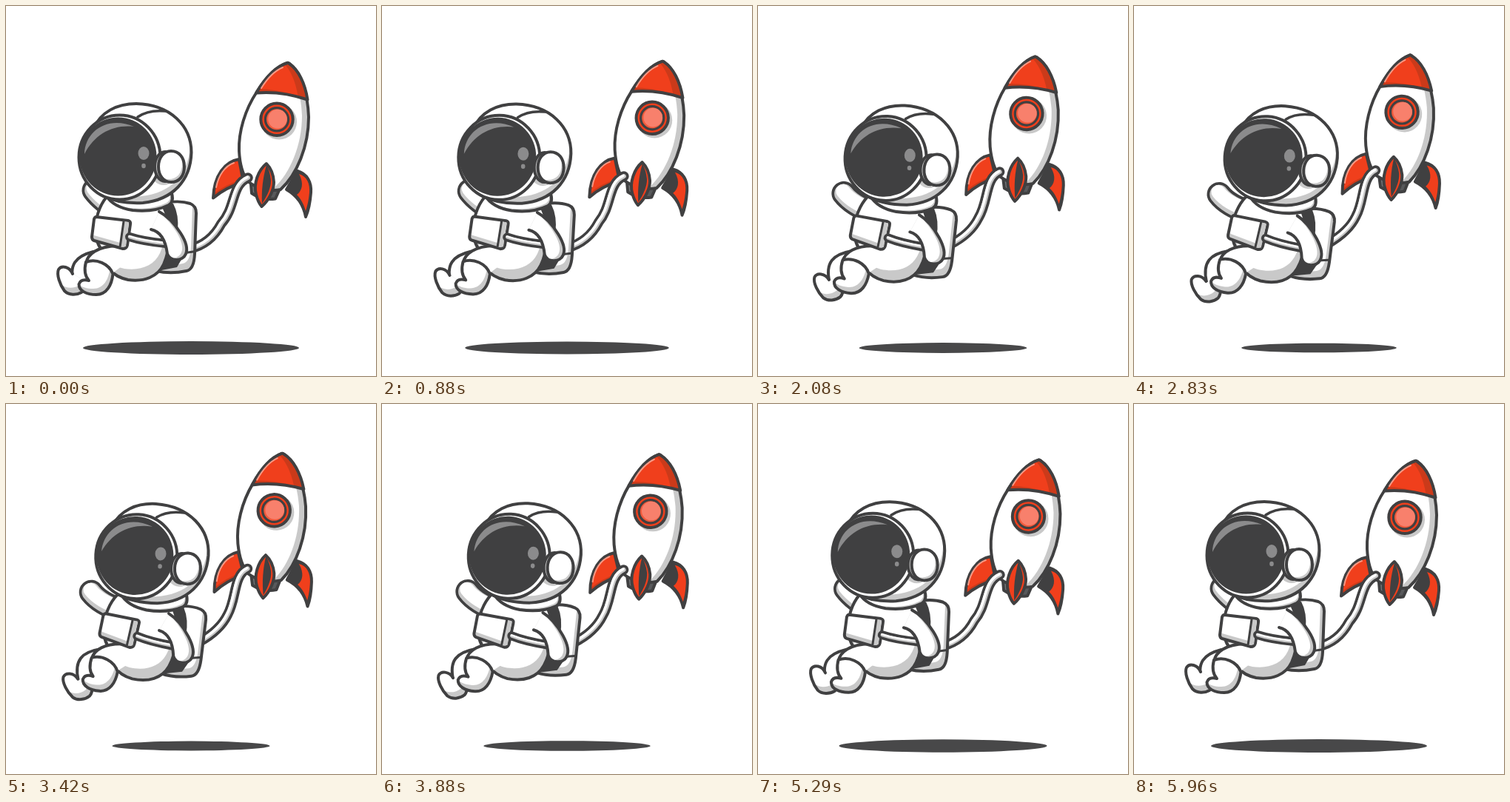
An HTML page that plays this animation: 500x500 px, repeating every 6 s.

```html
<!DOCTYPE html>
<html lang="en">
<head>
<meta charset="utf-8">
<title>Floating astronaut</title>
<style>
  html, body { margin: 0; width: 100%; height: 100%; overflow: hidden; background: #fff; }
  svg { display: block; width: 100vw; height: 100vh; }
</style>
</head>
<body>
<svg id="stage" viewBox="0 0 500 500" stroke-linecap="round" stroke-linejoin="round"></svg>
<script>
const LOOP = 6000;
const INK = '#404041', RED = '#f03f1c', DEEP = '#cb3a1a', PINK = '#f8806c', GRAY = '#c9c9c9', GLOSS = '#8b8b8c';
const stage = document.getElementById('stage');
let clips = 0;

function add(parent, tag, attrs = {}) {
  const el = document.createElementNS('http://www.w3.org/2000/svg', tag);
  for (const key in attrs) el.setAttribute(key, attrs[key]);
  return parent.appendChild(el);
}
const group = parent => add(parent, 'g');
const fill = (parent, d, color) => add(parent, 'path', { d, fill: color });
const line = (parent, d, color = INK, width = 4) =>
  add(parent, 'path', { d, fill: 'none', stroke: color, 'stroke-width': width });
const oval = (parent, cx, cy, rx, ry, color, width = 0) =>
  add(parent, 'ellipse', { cx, cy, rx, ry, fill: color, stroke: INK, 'stroke-width': width });

// Outlined shape: shade colour below, a lit copy shifted by (dx, dy) inside it
function solid(parent, d, dx, dy, lit = '#fff', shade = GRAY) {
  const id = 'c' + clips++;
  add(add(parent, 'clipPath', { id }), 'path', { d });
  fill(parent, d, shade);
  const inside = add(parent, 'g', { 'clip-path': `url(#${id})` });
  add(inside, 'path', { d, fill: lit, transform: `translate(${dx} ${dy})` });
  line(parent, d);
  return inside;
}

// Outlined tube with a lit side; returns a setter for its path
function tube(parent, width, dx, dy) {
  const outer = line(parent, '', INK, width);
  const inner = line(parent, '', GRAY, width - 7.5);
  const lit = line(parent, '', '#fff', width - 7.5 - 2 * Math.hypot(dx, dy));
  lit.setAttribute('transform', `translate(${dx} ${dy})`);
  return d => [outer, inner, lit].forEach(p => p.setAttribute('d', d));
}

const shadow = oval(stage, 250, 462, 146, 9, '#484849');

// Rocket
const rocket = group(stage);
solid(rocket, 'M315 207 C296 210 281 229 280 259.5 Q297 245 321 238 Z', -3, -3, RED, DEEP);
line(rocket, 'M284 245 C287 229 296 216 308 212', '#f79a86', 2);
solid(rocket, 'M394 223 C407 227 413 238 412 252 C411 265 409 276 405 285 C402 268 393 256 379 248 Z', 0, 0, INK, INK);
fill(rocket, 'M396 227 C407 230 411 241 410 252 C409 263 407 271 405 277 C402 267 398 260 393 255 C400 250 403 240 396 227 Z', RED);
solid(rocket, 'M331 241 L370 247 L364 260.5 Q346 263 332 253 Z', -8, 0, '#77787a', '#58595b');
const hull = 'M380 77 C364 82 350 98 339 116 C323 140 314 170 315 196 C316 215 320 228 327 237 C338 246 355 251 371 248 C393 228 409 190 409 150 C408 117 397 88 383 78 Q381.5 76.5 380 77 Z';
const skin = solid(rocket, hull, -9, -2);
oval(skin, 369, 156.5, 24, 24, GRAY);
solid(rocket, 'M380 77 C364 82 350 98 338 117.5 Q372 114.5 407.5 126.5 C404 104 395 86 383 78 Q381.5 76.5 380 77 Z', -13, -5, RED, DEEP);
line(rocket, 'M345 111 C353 98 362 88 374 83', '#f79a86', 2);
oval(rocket, 366, 153.3, 21.7, 21.7, RED, 4);
oval(rocket, 366, 153.3, 15.6, 15.6, '#f15a3c', 3.2);
oval(rocket, 367, 152.6, 12.8, 12.8, PINK);
solid(rocket, 'M351.8 213 C340.8 222 334 240 338 255 Q340.5 265 345.5 271 C356 262 362 248 362 238 Q361 222 351.8 213 Z', 0, 0, RED);
fill(rocket, 'M352 215 C347 232 345 250 346 267 C354 255 358 245 358 236 Q357 224 352 215 Z', INK);

const setHose = tube(stage, 13.5, -1, -0.6);
const setArm = tube(stage, 33, -1, -3);

// Body behind the back foot
const rear = group(stage);
solid(rear, 'M200 270 C225 262 240 264 249 267 Q257 270 257 280 L255 335 Q254 356 244 358 C230 361 215 361 203 358 Z', -5, -10);
line(rear, 'M239 334 L253 332', INK, 3);
fill(rear, 'M208 268 L226 267 Q234 282 232 304 L210 290 Z', INK);
fill(rear, 'M212 336 L242 334 L231 353 L205 358 Z', INK);
fill(rear, 'M92 376 C84 350 94 338 118 332 L138 345 L112 374 Z', '#fff');
line(rear, 'M92 376 C84 350 94 338 118 332');

const foot = group(stage);
solid(foot, 'M90 362 C86 352 75 350 71 356 C68 363 73 377 79 385 C85 391 95 391 102 387 Q107 383 108 372', -4, -9);

// Torso, front leg, pouch and front arm
const body = group(stage);
solid(body, 'M136 258 C126 270 120 288 121 306 C122 318 126 328 134 334 C132 350 142 365 165 370 C187 373 205 366 213 349 C222 330 224 292 214 274 L222 262 Z', -5, -15);
fill(body, 'M108 348 C110 335 124 325 150 324 L156 352 L144 361 Z', '#fff');
line(body, 'M108 348 C110 335 124 325 150 324');
solid(body, 'M108 346 C122 341 139 348 144.5 362 C143 377 136 390 122 390 C109 390 98.5 385 98.5 376 Q101 368 112 371 Q104 362 108 346 Z', -4, -8);
solid(body, 'M122 285 L165 290 Q169 291 168 295 L164 323 Q163 328 158 328 L119 317 Q116 316 116 312 L119 288 Q120 285 122 285 Z', 0, -7);
fill(body, 'M159 291 L166 292 L162 325 L155 326 Z', GRAY);
line(body, 'M159 291 L154 326', INK, 3);
tube(body, 12, -0.5, -1)('M167 312 C182 317 196 319 216 321');
solid(body, 'M207 278 C219 284 229 296 236 307 C243 318 246 328 243 335 C239 345 222 346 218 335 C216 319 210 305 196 302', -6, -2);

// Head
const head = group(stage);
solid(head, 'M135 256 Q145 272 171 276 Q200 279 220 269 Q228 264 223 250 Z', -3, -3);
const shell = solid(head, 'M118 166 C128 143 150 132 176 132 C222 133 250.5 162 250.5 198 C249.5 236 225 262 185 266 C165 267 145 264 130 256 Z', -2, -9);
oval(shell, 213, 222, 18, 20, GRAY);
line(head, 'M178 150 Q192 140 215 142', INK, 3.5);
oval(head, 153.5, 204.5, 55, 57, '#fff', 4);
oval(head, 151.5, 203.5, 52, 53, INK);
fill(head, 'M106 200 C107 169 137 148 173 163 C144 160 120 173 106 200 Z', GLOSS);
oval(head, 186, 199, 7.5, 9, GLOSS);
oval(head, 186, 216, 2.8, 3.2, GLOSS);
oval(head, 215, 217, 14, 20, GRAY, 4);
solid(head, 'M223 196 C234 196 241 205 241 217 C241 230 234 238 223 238 C213 238 206 229 206 217 C206 205 213 196 223 196 Z', -3, -4);

// Path text with {from,to} slots blended by k
const blend = (text, k) => text.replace(/\{([\d.]+),([\d.]+)\}/g, (_, a, b) => (+a + (b - a) * k).toFixed(2));
const HOSE = 'M{327,326.5} {232,222} C{304,307} {242,231} {311,312} {272,262} {291,300} {294,284} Q{276,290} {322,305} {248,262} {328,321}';
const ARM = 'M{119,115} {249,254.5} Q{130,127} {264,270} 156 279';
const move = (el, k, x, y, deg, cx, cy) =>
  el.setAttribute('transform', `translate(${x * k} ${y * k}) rotate(${deg * k} ${cx} ${cy})`);

function draw(time) {
  const t = time % LOOP;
  const k = (1 - Math.cos(2 * Math.PI * t / LOOP)) / 2;
  // The astronaut swings back a little faster than it swings out
  const sway = t < LOOP / 2 ? k : k ** 1.3;
  shadow.setAttribute('rx', 146 - 41.5 * k);
  shadow.setAttribute('ry', 9 - 2.7 * k);
  move(rocket, k, 0, -9, -2.9, 345, 231);
  move(rear, sway, 0, -1, 5.2, 122, 440);
  move(body, sway, 0, -2.5, 5, 122, 440);
  move(foot, k, 9, 11, -10, 85, 370);
  move(head, sway, 24.5, 3, 3.3, 175, 200);
  setHose(blend(HOSE, k));
  setArm(blend(ARM, k));
}

function tick() {
  draw(performance.now());
  requestAnimationFrame(tick);
}
tick();
</script>
</body>
</html>
```
